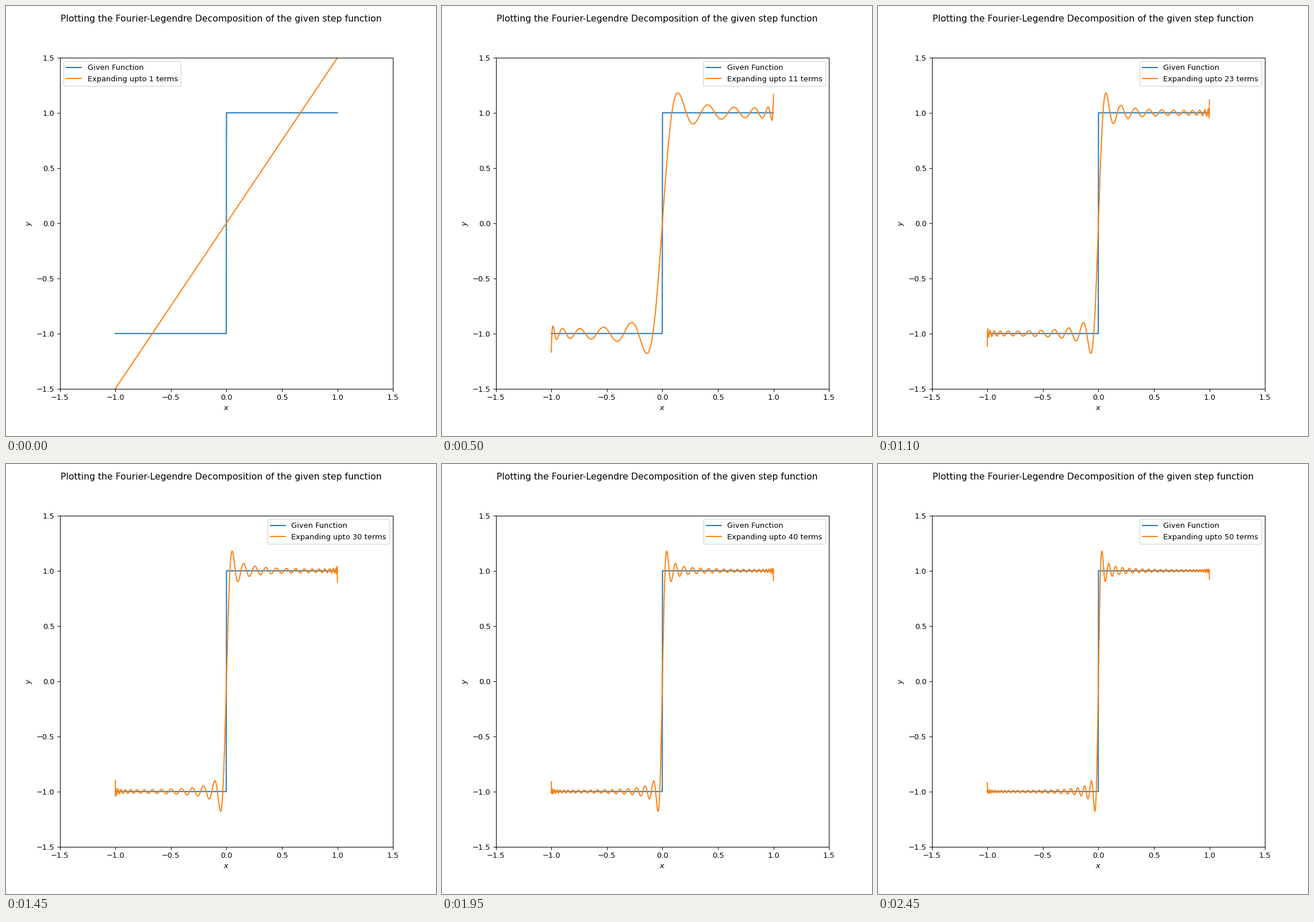
Animation of 748 by 748 pixels, one loop 2500 ms. Source, as a matplotlib script:

```python
import numpy as np
import matplotlib.pyplot as plt
from matplotlib.animation import FuncAnimation

SIZE, INCHES = 748, 8
TERMS = 50
INTERVAL = 50


def legendre_values(x, top):
    """Rows P_0(x) .. P_top(x) by the three-term recurrence."""
    rows = [np.ones_like(x), x]
    for k in range(1, top):
        rows.append(((2 * k + 1) * x * rows[k] - k * rows[k - 1]) / (k + 1))
    return np.array(rows)


x = np.linspace(-1, 1, 1000)
step = np.where(x < 0, -1.0, 1.0)

# Only odd degrees contribute: c_l = P_{l-1}(0) - P_{l+1}(0)
degrees = np.arange(1, 2 * TERMS, 2)
at_zero = legendre_values(np.zeros(1), 2 * TERMS)[:, 0]
coeffs = at_zero[degrees - 1] - at_zero[degrees + 1]
basis = legendre_values(x, 2 * TERMS)[degrees]
partial_sums = np.cumsum(coeffs[:, None] * basis, axis=0)

fig, ax = plt.subplots(figsize=(INCHES, INCHES), dpi=SIZE / INCHES)
fig.suptitle("Plotting the Fourier-Legendre Decomposition of the given step function")
ax.set(xlim=(-1.5, 1.5), ylim=(-1.5, 1.5), xlabel="$x$", ylabel="$y$")
ax.plot(x, step, label="Given Function")
(series,) = ax.plot(x, partial_sums[0])


def update(i):
    series.set_ydata(partial_sums[i])
    series.set_label(f"Expanding upto {i + 1} terms")
    # Rebuilt each time so it moves to the emptiest corner
    ax.legend(loc="best")
    return (series,)


anim = FuncAnimation(fig, update, frames=TERMS, interval=INTERVAL, repeat=True)
plt.show()
```
